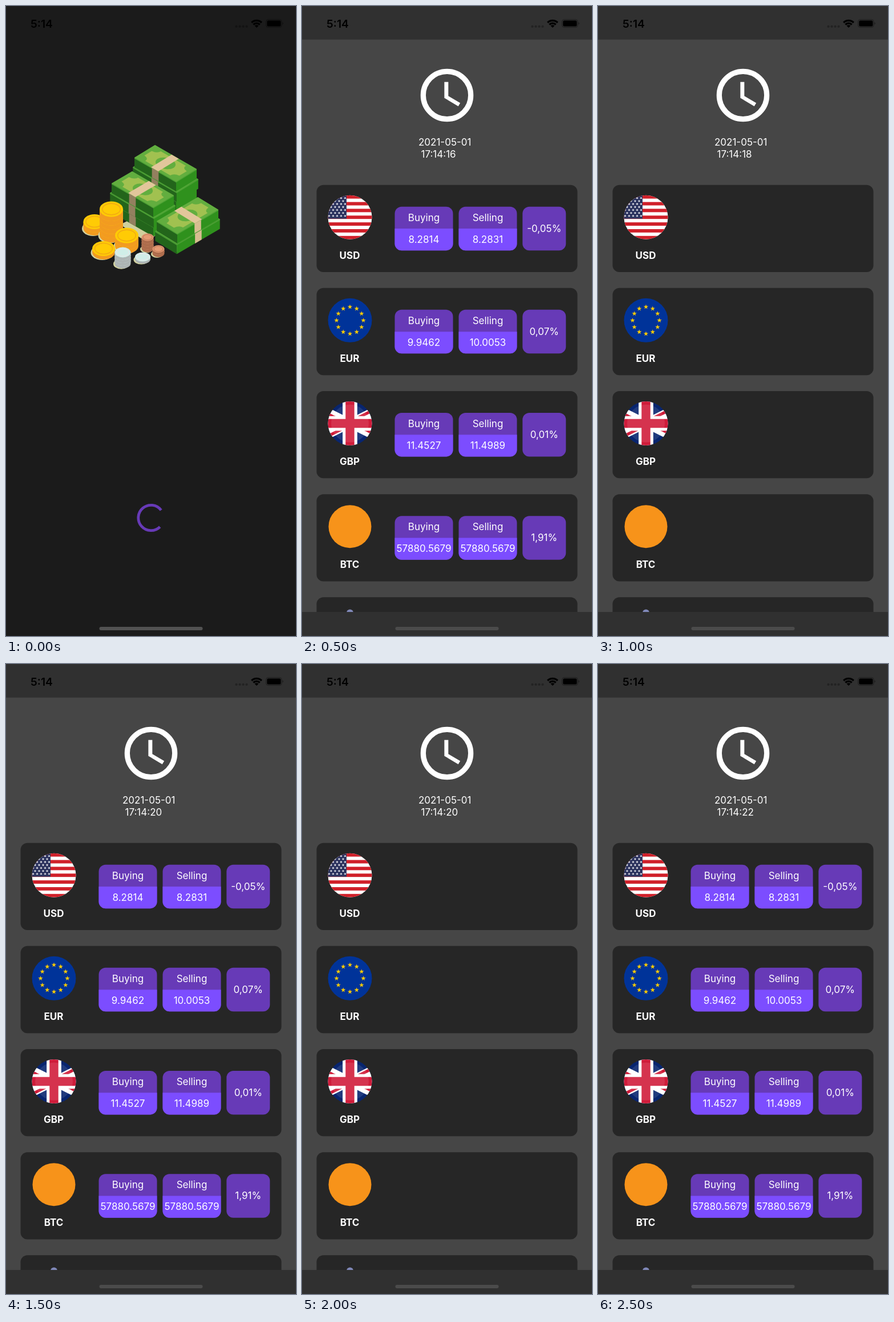
Write an HTML page that moves like this. It is 508 px wide and 1101 px high and loops after 3000 ms.

```html
<!DOCTYPE html>
<html>
<head>
<meta charset="utf-8">
<style>
html, body { margin: 0; width: 100%; height: 100%; overflow: hidden; background: #1b1b1b; }
svg { display: block; width: 508px; height: 1101px; }
text { font: 17px Inter, sans-serif; fill: #fff; }
.mid { text-anchor: middle; }
.code { font-weight: 700; }
</style>
</head>
<body>
<svg id="stage" viewBox="0 0 508 1101"></svg>
<script>
const range = n => [...Array(n).keys()];
const rect = (x, y, w, h, fill, r = 0) =>
  `<rect x="${x}" y="${y}" width="${w}" height="${h}" rx="${r}" fill="${fill}"/>`;
const circle = (x, y, r, fill) => `<circle cx="${x}" cy="${y}" r="${r}" fill="${fill}"/>`;
const ellipse = (x, y, rx, ry, fill, extra = '') =>
  `<ellipse cx="${x}" cy="${y}" rx="${rx}" ry="${ry}" fill="${fill}" ${extra}/>`;
const poly = (points, fill) => `<polygon points="${points.join(' ')}" fill="${fill}"/>`;
const label = (x, y, s, cls = 'mid') => `<text class="${cls}" x="${x}" y="${y}">${s}</text>`;
const star = (x, y, r, fill) => poly(range(10).map(i => {
  const a = i * Math.PI / 5, d = i % 2 ? r * .4 : r;
  return [x + d * Math.sin(a), y - d * Math.cos(a)];
}), fill);

// Pile of banknotes: top corner, long edge, short edge, layer count
function notes([x, y], [ux, uy], [vx, vy], n, dark, light) {
  const at = (a, b, h = 0) => [x + ux * a + vx * b, y + uy * a + vy * b + h];
  const step = 17, flip = ux < 0;
  const wall = (p, q, h, fill) => poly([p, q, [q[0], q[1] + h], [p[0], p[1] + h]], fill);
  let out = '';
  for (let i = n - 1; i >= 0; i--) {
    const d = i % 2 ? .025 : 0, h = i * step;
    const a = at(-d, 1 + d, h), b = at(1 + d, 1 + d, h), c = at(1 + d, -d, h);
    out += poly([at(-d, -d, h), c, b, a], '#55a838')
      + wall(a, b, step, flip ? light : dark) + wall(b, c, step, flip ? dark : light)
      + wall(a, b, 1.5, '#4fa537') + wall(b, c, 1.5, '#4fa537')
      + wall(at(.42, 1 + d, h), at(.58, 1 + d, h), step, flip ? '#d8bd91' : '#93805f');
  }
  const m = [ux / 100, uy / 100, vx / 50, vy / 50, x, y];
  return out + `<g transform="matrix(${m})">${rect(0, 0, 100, 50, '#62ae3f')}
    <path fill="#a1c150" d="M20 6H80Q80 15 92 16V34Q80 35 80 44H20Q20 35 8 34V16Q20 15 20 6Z"/>
    ${ellipse(50, 25, 19, 15, '#62ae3f')}${rect(40, 0, 17, 50, '#e2c69b')}</g>`;
}

const gold = ['#ffcb05', '#f29b20', '#f3ad12'];
const silver = ['#d0eee8', '#adb4b4', '#e3e8e7'];
const copper = ['#e69b74', '#ad6c4c', '#c98460'];
function coins(x, y, rx, ry, n, step, [top, side, rim]) {
  const base = y + n * step;
  let out = ellipse(x - 2.5, base + 1, rx, ry, '#d3d39f');
  for (let i = n - 1; i >= 0; i--) {
    const t = y + i * step, b = t + step;
    out += `<path fill="${side}" d="M${x - rx} ${t}V${b}A${rx} ${ry} 0 0 0 ${x + rx} ${b}V${t}Z"/>`
      + ellipse(x, t, rx, ry, top);
  }
  return out + ellipse(x, y, rx * .77, ry * .73, 'none', `stroke="${rim}" stroke-width="1.6"`);
}

const money = notes([261, 243], [73, 42], [-36, 22], 4, '#23651b', '#2f911d')
  + poly([[200, 382], [218, 373], [265, 399], [246, 412]], '#cfcf9c')
  + notes([221, 289], [73, 42], [-36, 21], 3, '#23651b', '#2f911d')
  + poly([[266, 410], [300, 418], [303, 429], [296, 431]], '#cfcf9c')
  + notes([336, 334], [-72, 42], [36, 22], 2, '#23651b', '#2f911d')
  + coins(155, 377, 19.5, 13, 2, 5.5, gold)
  + coins(184.5, 355, 20.5, 13.5, 6, 7.5, gold)
  + coins(248, 404, 10.5, 6.5, 4, 5, copper)
  + coins(211.5, 401, 20.5, 13.5, 3, 6, gold)
  + coins(171, 424, 20, 13, 1, 6, gold)
  + coins(267, 424.5, 10.5, 6.5, 2, 4, copper)
  + coins(204.5, 430.5, 14, 9, 4, 4.8, silver)
  + coins(239.5, 438.5, 13.5, 8, 1, 4, silver);

const polar = deg => [254 + 22.2 * Math.cos(deg * Math.PI / 180), 894.5 + 22.2 * Math.sin(deg * Math.PI / 180)];
const splash = money + `<path d="M${polar(45)}A22.2 22.2 0 1 1 ${polar(-37)}"
  fill="none" stroke="#673ab7" stroke-width="4.8"/>`;

// Badges are drawn around 0,0 with a radius of 38.5
const usd = rect(-39, -39, 78, 78, '#fff')
  + range(7).map(i => rect(-39, -38.5 + i * 11.85, 78, 5.92, '#d0202a')).join('')
  + rect(-39, -39, 33, 41.5, '#2e3560')
  + range(7).map(j => range(5 - j % 2).map(i =>
      star(-36.5 + i * 7 + j % 2 * 3.5, -33.5 + j * 5.2, 2.3, '#fff')).join('')).join('');
const eur = circle(0, 0, 39, '#003399')
  + range(12).map(i => star(23.5 * Math.sin(i * Math.PI / 6), -23.5 * Math.cos(i * Math.PI / 6), 4.4, '#ffcc00')).join('');
const gbp = `<g transform="scale(2.567) translate(-30 -15)">
  <clipPath id="saltire"><path d="M30 15h30v15zv15H0zH0V0zV0h30z"/></clipPath>
  ${rect(0, 0, 60, 30, '#08256f')}
  <path d="M0 0L60 30M60 0L0 30" stroke="#fff" stroke-width="6"/>
  <path d="M0 0L60 30M60 0L0 30" stroke="#cf1a37" stroke-width="4" clip-path="url(#saltire)"/>
  <path d="M30 0V30M0 15H60" stroke="#fff" stroke-width="10"/>
  <path d="M30 0V30M0 15H60" stroke="#d01c3a" stroke-width="6"/></g>`
  + circle(0, 0, 33, 'rgba(255,255,255,.1)');
const btc = circle(0, 0, 37.5, '#f7931a');

const rows = [
  ['USD', usd, '8.2814', '8.2831', '-0,05%'],
  ['EUR', eur, '9.9462', '10.0053', '0,07%'],
  ['GBP', gbp, '11.4527', '11.4989', '0,01%'],
  ['BTC', btc, '57880.5679', '57880.5679', '1,91%']
];
const rowY = i => 312.7 + i * 180.15;

const card = i => rect(25.5, rowY(i), 457, 152.3, '#262626', 12);
const cards = rows.map(([code, badge], i) => card(i)
  + `<g transform="translate(84 ${rowY(i) + 56.5})" clip-path="url(#disc)">${badge}</g>`
  + label(83.5, rowY(i) + 129.3, code, 'mid code')).join('') + card(4) + circle(84, 1060.5, 6, '#8088b8');

function price(x, y, title, value) {
  return rect(x, y, 102, 76.5, '#673ab7', 12)
    + `<path fill="#7c4dff" d="M${x} ${y + 38.3}h102v26.2a12 12 0 0 1 -12 12h-78a12 12 0 0 1 -12 -12z"/>`
    + label(x + 51, y + 25, title) + label(x + 51, y + 63.2, value);
}
const prices = rows.map(([, , buy, sell, change], i) => {
  const y = rowY(i) + 38;
  return price(162.5, y, 'Buying', buy) + price(274.5, y, 'Selling', sell)
    + rect(386.3, y, 76, 76.5, '#673ab7', 12) + label(424.3, y + 44.2, change);
}).join('');

const clock = `<g transform="translate(254 156) scale(4.63) translate(-12 -12)" fill="#fff">
  <circle cx="12" cy="12" r="9" fill="none" stroke="#fff" stroke-width="2"/>
  <path d="M12.5 7H11v6l5.25 3.15.75-1.23-4.5-2.67z"/></g>`;

const wifi = `<g fill="none" stroke="#000" stroke-width="3.2">
  <path d="M430.2 29A12.6 12.6 0 0 1 447.8 29M433.4 32.5A8 8 0 0 1 444.6 32.5"/></g>
  <path d="M439 38L435.6 34.6A4.8 4.8 0 0 1 442.4 34.6Z"/>`;
const battery = `<rect x="455.5" y="23.5" width="27.5" height="14" rx="4" fill="none" stroke="#000" stroke-opacity=".4"/>
  ${rect(457.2, 25.2, 24.2, 10.6, '#000', 2.5)}<path d="M484.5 28.3q2.4 2.2 0 4.4z" fill-opacity=".5"/>`;
const status = `<text x="43" y="37.7" style="font-size:19.3px;font-weight:600;fill:#000">5:14</text>`
  + range(4).map(i => rect(401.5 + i * 6, 33.8, 4, 4, 'rgba(0,0,0,.28)', 1.5)).join('') + wifi + battery;

stage.innerHTML = `<clipPath id="disc"><circle r="38.5"/></clipPath>
  ${rect(0, 0, 508, 1101, '#1b1b1b')}
  <g id="splash">${splash}</g>
  <g id="home">${rect(0, 0, 508, 1101, '#464646')}${clock}
    ${label(204, 244, '2021-05-01', '')}<text id="clockText" x="208.5" y="265"></text>
    ${cards}<g id="prices">${prices}</g>
    ${rect(0, 0, 508, 58.7, '#303030')}${rect(0, 1059, 508, 42, '#303030')}</g>
  ${status}<rect id="bar" x="163.5" y="1085" width="181" height="6" rx="3"/>`;

const $ = id => document.getElementById(id);
const show = (id, on) => $(id).setAttribute('display', on ? 'inline' : 'none');
const seconds = [16, 16, 18, 20, 20, 22];
function draw() {
  const step = Math.floor(performance.now() % 3000 / 500);
  show('splash', step === 0);
  show('home', step > 0);
  show('prices', step % 2);
  $('clockText').textContent = '17:14:' + seconds[step];
  $('bar').setAttribute('fill', step ? '#4b4b4b' : '#525252');
  requestAnimationFrame(draw);
}
draw();
</script>
</body>
</html>
```
